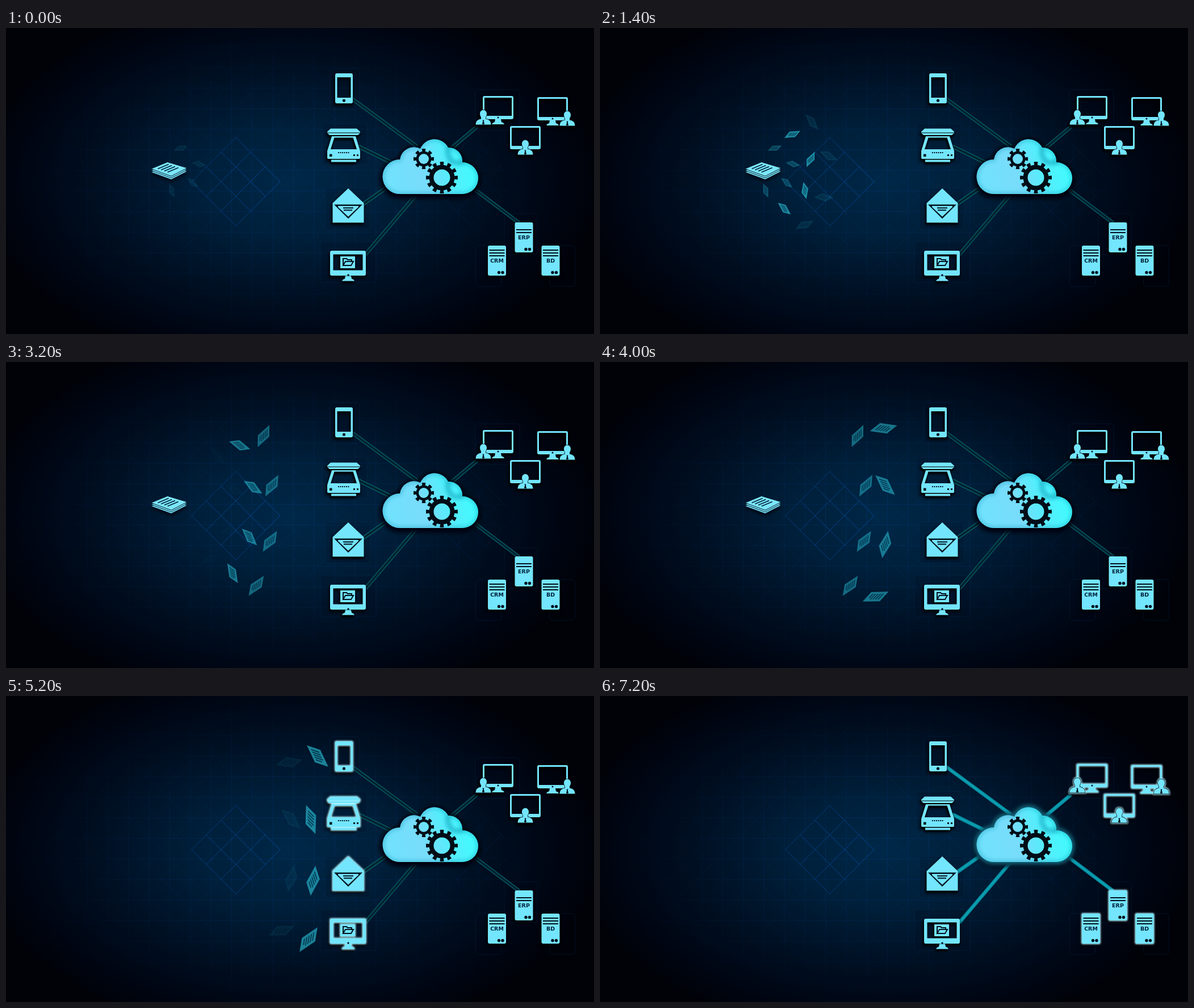
An HTML page for the animation above (8 s loop, 1036 by 540 pixels).

```html
<!DOCTYPE html>
<html lang="en">
<head>
<meta charset="utf-8">
<title>Documents to cloud</title>
<style>
html, body { margin: 0; width: 100%; height: 100%; overflow: hidden; background: #00020a; }
svg { display: block; width: 100vw; height: 100vh; }
.icon { fill: #73e5fc; fill-rule: evenodd; }
.ink { fill: #01121f; }
.rule { stroke: #01121f; stroke-width: 2; fill: none; }
text { font: bold 9.5px "DejaVu Sans", sans-serif; fill: #01223a; text-anchor: middle; }
</style>
</head>
<body>
<svg viewBox="0 0 1036 540" preserveAspectRatio="none">
  <defs>
    <radialGradient id="sky" gradientUnits="userSpaceOnUse" cx="0" cy="0" r="1" gradientTransform="translate(500 272) scale(545 330)">
      <stop offset="0" stop-color="#002848"/>
      <stop offset=".3" stop-color="#001f3a"/>
      <stop offset=".6" stop-color="#001023"/>
      <stop offset=".87" stop-color="#000512"/>
      <stop offset="1" stop-color="#000208"/>
    </radialGradient>
    <radialGradient id="fade" gradientUnits="userSpaceOnUse" cx="0" cy="0" r="1" gradientTransform="translate(490 272) scale(500 300)">
      <stop offset="0" stop-color="#fff"/>
      <stop offset=".5" stop-color="#999"/>
      <stop offset="1" stop-color="#000"/>
    </radialGradient>
    <mask id="vignette"><rect width="1036" height="540" fill="url(#fade)"/></mask>
    <linearGradient id="cloudFill" x1="0" y1=".6" x2="1" y2=".4">
      <stop offset="0" stop-color="#70e2fd"/>
      <stop offset=".4" stop-color="#78dcfb"/>
      <stop offset=".68" stop-color="#52eefc"/>
      <stop offset="1" stop-color="#3dffff"/>
    </linearGradient>
    <filter id="shadow" x="-20%" y="-20%" width="140%" height="140%">
      <feMorphology in="SourceAlpha" operator="dilate" radius="1"/>
      <feGaussianBlur stdDeviation="2"/>
      <feOffset dx="-1" dy="3"/>
    </filter>
    <filter id="halo" x="-20%" y="-20%" width="140%" height="140%">
      <feMorphology in="SourceAlpha" operator="dilate" radius=".7"/>
      <feGaussianBlur stdDeviation="1.4" result="edge"/>
      <feFlood flood-color="#b4f3ff"/>
      <feComposite in2="edge" operator="in"/>
    </filter>
    <filter id="soft" x="-20%" y="-30%" width="140%" height="160%"><feGaussianBlur stdDeviation="3.5"/></filter>
    <path id="cloud" d="M694 293A30.5 30.5 0 0 1 694 232A25 25 0 0 1 730 213A27 27 0 0 1 779 211A24 24 0 0 1 804 237A28 28 0 0 1 804 293Z"/>
    <clipPath id="cloudClip"><use href="#cloud"/></clipPath>

    <!-- rhomboid page, one unit long, lying along the x axis -->
    <g id="page" transform="matrix(.416 -.209 .584 .209 -.5 0)">
      <path d="M0 0H1V1H0Z" fill="#2cc4d8"/>
      <path d="M.2 .2H.8M.2 .35H.8M.2 .5H.8M.2 .65H.8M.2 .8H.65" stroke="#03455c" stroke-width=".07"/>
    </g>
    <g id="person">
      <path d="M-6 -19C-6 -28 6 -28 6 -19C6 -16 4.500 -14 4 -13L4 -10Q13 -9 13.500 0H-13.500Q-13 -9 -4 -10L-4 -13C-4.500 -14 -6 -16 -6 -19Z" stroke="#010a16" stroke-width="1.500" paint-order="stroke"/>
      <path class="ink" d="M-1.500 -8H1.500L.8 -6L2 -1L0 0L-2 -1L-.8 -6Z"/>
    </g>
    <path id="screen" d="M3 0H51Q54 0 54 3V38Q54 41 51 41H3Q0 41 0 38V3Q0 0 3 0ZM3 3V35H51V3Z"/>
    <path id="stand" d="M-5 0H5L6 5Q10 6 11 9H-11Q-10 6 -6 5Z"/>

    <g id="devices" class="icon">
      <path d="M583 80H608Q611 80 611 83V130Q611 133 608 133H583Q580 133 580 130V83Q580 80 583 80ZM583.500 87V123H607.500V87Z"/>
      <circle class="ink" cx="595.500" cy="128" r="2.600"/>

      <path d="M572 177.500H618L624 183V184.500H566V183Z"/>
      <path d="M566 185.500H624L620 189H570Z"/>
      <path d="M574 191H616L624 217V229Q624 231 622 231H568Q566 231 566 229V217ZM578.500 193.500L572 214H618L611.500 193.500Z"/>
      <path d="M573 232.500H617V236.500H573Z"/>
      <path class="rule" d="M585 220H605" stroke-dasharray="2 1.500"/>
      <path class="ink" d="M570 222.500H574.500V227H570ZM612 223H615V226H612ZM618 223H621V226H618Z"/>

      <path d="M603 283L630.500 309V343.500H575.500V309Z"/>
      <path class="ink" d="M578 311.500H628L603 336.500Z"/>
      <path d="M585 314H621V316L603 333L585 316Z"/>
      <path class="rule" d="M594 317.500H612M595 321.500H610"/>

      <path d="M574 393H631Q634 393 634 396V434Q634 437 631 437H574Q571 437 571 434V396Q571 393 574 393ZM576.500 399.500V427.500H628.500V399.500Z"/>
      <use href="#stand" x="603" y="437.500"/>
      <circle class="ink" cx="603" cy="436" r="1.700"/>
      <path d="M589 403H615V424H589Z"/>
      <path class="rule" d="M594 419V407H600L602 409H609V412M594 419L598 412H612L608 419Z"/>
    </g>
    <g id="offices" class="icon"></g>
  </defs>

  <rect width="1036" height="540" fill="url(#sky)"/>
  <g id="mesh" mask="url(#vignette)" fill="none" stroke="#0a56b8"></g>
  <g id="panels" fill="#000713" fill-opacity=".12" stroke="#0b3152" stroke-opacity=".35"></g>

  <g id="links" fill="none"></g>
  <g id="linksIn" fill="none"></g>
  <g id="linksOut" fill="none"></g>

  <use href="#cloud" filter="url(#soft)" stroke="#000610" stroke-width="9" transform="translate(0 3)"/>
  <use id="cloudGlow" href="#cloud" filter="url(#soft)" stroke="#126a82" stroke-width="8"/>
  <use href="#cloud" fill="url(#cloudFill)"/>
  <g clip-path="url(#cloudClip)" fill="none" filter="url(#soft)" stroke="#0c8ca8">
    <use href="#cloud" stroke-opacity=".45" stroke-width="5"/>
    <path d="M779 211Q776 225 786 236Q794 240 806 236" stroke-opacity=".5" stroke-width="8"/>
  </g>
  <g id="gears" fill="none" stroke="#010d17"></g>

  <g id="pages"></g>
  <g id="stack" fill="#7be6fb"></g>

  <use href="#devices" filter="url(#shadow)"/>
  <use id="devicesGlow" href="#devices" filter="url(#halo)"/>
  <use href="#devices"/>
  <use href="#offices" filter="url(#shadow)"/>
  <use id="officesGlow" href="#offices" filter="url(#halo)"/>
  <use href="#offices"/>
</svg>
<script>
const LOOP = 8000, STEP = 200, LAST = 7200;
const $ = id => document.getElementById(id);
const fill = (id, html) => { $(id).innerHTML = html; };
const repeat = (n, make) => Array.from({ length: n }, (_, i) => make(i)).join('');
const line = (d, color, width, opacity = 1) =>
  `<path d="${d}" stroke="${color}" stroke-width="${width}" stroke-opacity="${opacity}"/>`;

// Backdrop: square grid, diagonal lattice and two brighter diamonds
const CELL = 36.3, DIAGONAL = 52, BLUE = '#0a56b8';
const grid = repeat(29, i => `M${34.5 + i * CELL} 0V540`) + repeat(15, i => `M0 ${33.5 + i * CELL}H1036`);
const lattice = repeat(30, i => `M${i * DIAGONAL - 466} 0l540 540M${i * DIAGONAL + 26} 0l-540 540`);
const diamond = (cx, cy, r) => repeat(4, i => {
  const k = r * i / 3;
  return `M${cx - r + k} ${cy - k}l${r} ${r}M${cx - r + k} ${cy + k}l${r} ${-r}`;
});
fill('mesh', line(grid, BLUE, 1, .2) + line(lattice, BLUE, 1, .13) +
  line(diamond(405, 271, 78), BLUE, 1, .6) + line(diamond(820, 271, 78), BLUE, 1, .25));

const panel = (cx, cy, w = 78) => `<rect x="${cx - w / 2}" y="${cy - 36}" width="${w}" height="72" rx="5"/>`;
fill('panels', panel(597, 108, 52) + panel(597, 205) + panel(602, 319) + panel(603, 413, 98) +
  panel(866, 145) + panel(907, 364, 58) + panel(850, 420, 45) + panel(980, 420, 45));

// Links between icons and cloud
const inbound = 'M610 125L724 209M621 209L680 238M626 313L670 282M633 400L722 295';
const outbound = 'M786 211L830 174M826 285L904 344';
const lit = d => line(d, '#067f93', 6.5) + line(d, '#0a9db0', 4);
fill('links', line(inbound + outbound, '#056068', 6.5) + line(inbound + outbound, '#02222f', 3.8));
fill('linksIn', lit(inbound));
fill('linksOut', lit(outbound));

// Gears: a ring plus a dashed ring of teeth
const gear = (x, y, hole, body, tip, teeth) => {
  const ring = (a, b, extra = '') =>
    `<circle cx="${x}" cy="${y}" r="${(a + b) / 2}" stroke-width="${b - a}" ${extra}/>`;
  return ring(hole, body) +
    ring(body - 1, tip, `pathLength="${teeth * 2}" stroke-dasharray="1 1" stroke-dashoffset=".5"`);
};
fill('gears', gear(736, 231, 9, 13.5, 18, 8) + gear(768, 264, 14.5, 22.5, 28, 12));

// Workstations (side: where the person sits) and servers
const dot = (x, y, r) => `<circle class="ink" cx="${x}" cy="${y}" r="${r}"/>`;
const desk = (x, y, side) => `<use href="#screen" x="${x}" y="${y}"/>
  <use href="#stand" x="${x + 27}" y="${y + 41}"/>${dot(x + 27, y + 38, 1.5)}
  <use href="#person" x="${x + 27 + side * 26}" y="${y + 50.5}"/>`;
const server = (x, y, label, slots) => `<rect x="${x}" y="${y}" width="32" height="53" rx="3"/>
  <path class="rule" d="${repeat(slots, i => `M${x + 2.5} ${y + 18 - (slots - 1 - i) * 5}h27`)}"/>
  <text x="${x + 16}" y="${y + 29.5}">${label}</text>${dot(x + 19.5, y + 47.5, 2.7)}${dot(x + 26, y + 47.5, 2.7)}`;
fill('offices', desk(840, 120, -1) + desk(936, 122, 1) + desk(888, 173, 0) +
  server(896.5, 343, 'ERP', 2) + server(849, 384, 'CRM', 3) + server(943.5, 384, 'BD', 3));

// Paper stack: shadow, three layers, printed lines
const leaf = (y, extra = '') => `<path d="M255.500 ${y}l29 -12l35 10.500l-28.500 14.500Z" ${extra}/>`;
fill('stack', leaf(257, 'fill="#000610" filter="url(#soft)"') +
  repeat(3, i => leaf(254.5 - i * 3, 'stroke="#02182a"')) +
  line(repeat(4, i => `M${267.5 + i * 5.7} ${248.5 + i * 2}l19 -8`), '#02263c', 1.8));

// Pages drift along four lanes; each column fades in and out in turn
const lanes = ['M308 212Q395 135 549 106', 'M340 240Q432 213 537 218',
  'M329 273Q423 318 541 326', 'M292 287Q386 387 533 430'];
const tilt = [-20, 156, 50, 20, 118, -12, 45];   // first lane's angle per column
const turn = [30, -38, -25, 14, 3, 57, 27];      // change from lane to lane
const FIRST_PEAK = 850, PACE = 690, FADE = 1000;

function pointOn(lane, t) {
  const [x0, y0, x1, y1, x2, y2] = lane.match(/\d+/g).map(Number);
  const bend = (a, b, c) => (1 - t) ** 2 * a + 2 * t * (1 - t) * b + t * t * c;
  return `${bend(x0, x1, x2)} ${bend(y0, y1, y2)}`;
}
fill('pages', repeat(tilt.length, col => '<g>' + repeat(lanes.length, row =>
  `<use href="#page" transform="translate(${pointOn(lanes[row], col / 6)})
    rotate(${tilt[col] + turn[col] * row}) scale(${26 + col * 4.6})"/>`) + '</g>'));
const columns = [...$('pages').children];

const ramp = (t, from, to) => Math.min(1, Math.max(0, (t - from) / (to - from)));
const show = (id, opacity) => { $(id).style.opacity = opacity; };

const start = performance.now();
function draw() {
  const elapsed = (performance.now() - start) % LOOP;
  const t = Math.min(LAST, Math.floor(elapsed / STEP) * STEP);
  columns.forEach((column, i) => {
    const distance = Math.abs(t - FIRST_PEAK - i * PACE);
    column.style.opacity = .78 * (1 - ramp(distance, 0, FADE));
  });
  show('stack', 1 - ramp(t, 4600, 5200));
  show('devicesGlow', ramp(t, 4600, 5200) - ramp(t, 6200, 6800));
  show('linksIn', ramp(t, 5200, 6000));
  show('cloudGlow', ramp(t, 5800, 6200));
  show('linksOut', ramp(t, 6200, 6800));
  show('officesGlow', ramp(t, 6600, 7200));
  requestAnimationFrame(draw);
}
draw();
</script>
</body>
</html>
```
